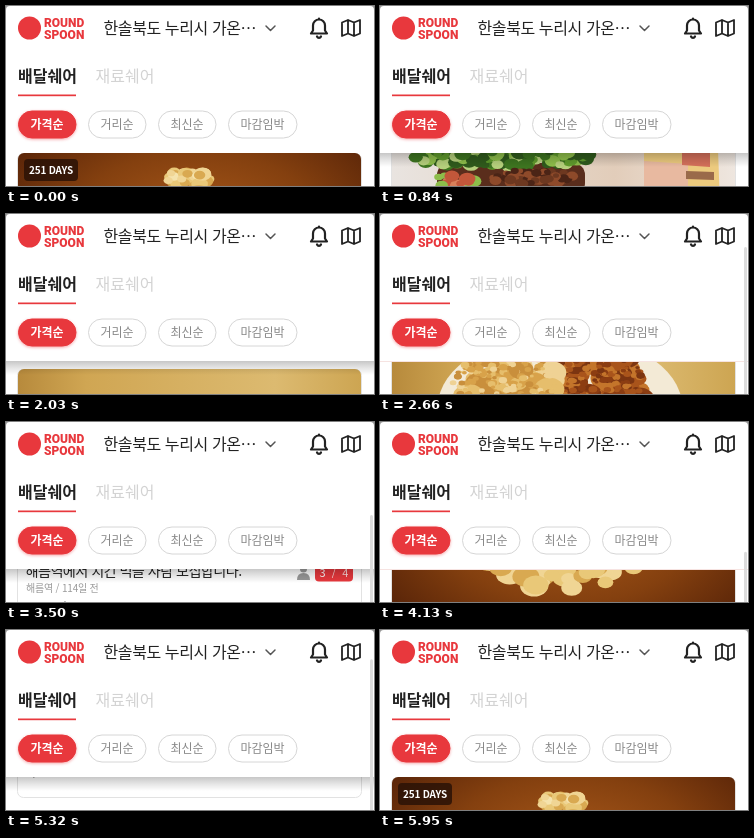
Recreate the animation shown at these times as an HTML page. Size 368 by 180 pixels, loop 6.16 s.

```html
<!DOCTYPE html>
<html lang="ko">
<head>
<meta charset="utf-8">
<title>배달쉐어</title>
<style>
  html, body { margin: 0; width: 100%; height: 100%; overflow: hidden; background: #fff; }
  svg { display: block; width: 368px; height: 180px; font-family: "Noto Sans CJK KR", "Noto Sans KR", "Noto Sans", sans-serif; }
  .brand { font: 900 12px Roboto, sans-serif; fill: #e8383d; }
  .place { font-size: 16px; letter-spacing: -.4px; fill: #222; }
  .tab { font-size: 16px; fill: #d3d3d3; }
  .tab.on { font-weight: 700; fill: #222; }
  .pill rect { fill: #fff; stroke: #d6d6d6; }
  .pill text { font-size: 12px; text-anchor: middle; fill: #888; }
  .pill.on rect { fill: #e8383d; stroke: #e8383d; filter: drop-shadow(0 1px 1.5px rgba(232, 56, 61, .45)); }
  .pill.on text { font-weight: 700; fill: #fff; }
  .icon { fill: none; stroke: #222; stroke-width: 2.2; stroke-linejoin: round; stroke-linecap: round; }
  .title { font-size: 14.2px; letter-spacing: -.6px; fill: #222; }
  .meta { font-size: 10px; letter-spacing: -.2px; fill: #999; }
  .price { font-size: 12px; fill: #222; }
  .count { font-size: 11px; text-anchor: middle; fill: #ffd9d9; }
  .count tspan { font-weight: 500; fill: #fff; }
  .days { font-size: 10px; font-weight: 700; letter-spacing: -.2px; text-anchor: middle; fill: #fff; }
</style>
</head>
<body>
<svg viewBox="0 0 368 180" xmlns="http://www.w3.org/2000/svg">
  <defs>
    <linearGradient id="shade" x2="0" y2="1">
      <stop stop-color="#000" stop-opacity=".22"/>
      <stop offset=".5" stop-color="#000" stop-opacity=".1"/>
      <stop offset="1" stop-color="#000" stop-opacity="0"/>
    </linearGradient>
    <radialGradient id="brown" cx=".52" cy=".35" r=".65">
      <stop stop-color="#a9591a"/>
      <stop offset=".55" stop-color="#84400f"/>
      <stop offset="1" stop-color="#572308"/>
    </radialGradient>
    <linearGradient id="cream">
      <stop stop-color="#e9e4e0"/>
      <stop offset=".65" stop-color="#e2cdba"/>
      <stop offset="1" stop-color="#eee6df"/>
    </linearGradient>
    <linearGradient id="wood">
      <stop stop-color="#b78a3c"/>
      <stop offset=".2" stop-color="#d0a653"/>
      <stop offset=".75" stop-color="#dcba70"/>
      <stop offset="1" stop-color="#cda552"/>
    </linearGradient>
    <clipPath id="frame"><path d="M0 200V6a6 6 0 0 1 6-6h331a6 6 0 0 1 6 6v194z"/></clipPath>
  </defs>

  <rect width="368" height="180" fill="#fff"/>
  <g id="list"></g>

  <rect id="shadow" y="147" width="368" height="14" fill="url(#shade)"/>
  <rect id="line" y="147" width="368" height="1" fill="#f6e3e1"/>
  <rect width="368" height="147" fill="#fff"/>

  <circle cx="23.5" cy="22" r="11.5" fill="#e8383d"/>
  <text class="brand" x="38" y="21">ROUND</text>
  <text class="brand" x="38" y="33">SPOON</text>
  <text class="place" x="97.5" y="27.5">한솔북도 누리시 가온⋯</text>
  <path class="icon" d="M260 20l4.500 4.500 4.500-4.500" style="stroke:#555;stroke-width:1.500"/>
  <path class="icon" d="M305 27.500h16l-2-3v-5a6 6 0 0 0-12 0v5zM313 13.500v-1M311 30.500a2.200 2.200 0 0 0 4 0"/>
  <path class="icon" d="M336 16.500l6-2.500 6 2.500 6-2.500v13.500l-6 2.500-6-2.500-6 2.500zM342 14v13.500M348 16.500v13.500" style="stroke-width:1.800"/>

  <text class="tab on" x="12" y="76">배달쉐어</text>
  <text class="tab" x="89.500" y="76">재료쉐어</text>
  <rect x="12" y="88.500" width="58" height="1.700" fill="#e8383d"/>
  <g id="pills"></g>

  <rect id="bar" x="364" width="3" height="230" rx="1.500" fill="#dcdcdc"/>
  <path d="M0 0h4a4 4 0 0 0-4 4zM368 0h-4a4 4 0 0 1 4 4z" fill="#999"/>
</svg>
<script>
const LOOP = 6160, STEP = 70, PITCH = 300, TOP = 147;
const $ = id => document.getElementById(id);

let seed = 7;
const rand = () => (seed = seed * 16807 % 2147483647) / 2147483647;

// Heap of rounded lumps inside an ellipse
function lumps(cx, cy, rx, ry, count, size, colors) {
  let out = '';
  for (let i = 0; i < count; i++) {
    const a = rand() * 2 * Math.PI, d = Math.sqrt(rand());
    const x = cx + Math.cos(a) * d * rx, y = cy + Math.sin(a) * d * ry;
    const r = size * (.5 + rand() * .6);
    const fill = colors[Math.floor(rand() * colors.length)];
    out += `<ellipse cx="${x.toFixed(1)}" cy="${y.toFixed(1)}" rx="${r.toFixed(1)}" ry="${(r * .75).toFixed(1)}" fill="${fill}"/>`;
  }
  return out;
}

// Large pieces with a fine crumb on top
const fried = (cx, cy, rx, ry, colors) =>
  lumps(cx, cy, rx, ry, 60, 16, colors) + lumps(cx, cy, rx, ry, 260, 4, colors);

const backdrop = id => `<rect width="343" height="200" fill="url(#${id})"/>`;
const gold = ['#e9c878', '#f5e3ad', '#d9a951', '#f0d594'];
const pale = ['#e6be6c', '#d8a24a', '#efd294', '#c98f3c'];
const dark = ['#a9541b', '#8c3d12', '#c4752b', '#7c3511'];

const crispy = () => backdrop('brown') +
  lumps(168, 26, 24, 8, 40, 8, gold) + lumps(170, 85, 85, 45, 130, 13, gold);

const burger = () => backdrop('cream') +
  '<path d="M30 108Q35 35 115 33T200 108z" fill="#c47a31"/>' +
  '<rect x="45" y="120" width="148" height="32" rx="12" fill="#5a2d1c"/>' +
  '<path d="M45 152h148q-2 36-74 36t-74-36z" fill="#c98742"/>' +
  '<path d="M252 45l72 5 4 112-76-4z" fill="#ecca7e"/>' +
  '<path d="M252 118l44 3v38l-44-2z" fill="#e8b9a0"/>' +
  '<path d="M290 106l28 2v16l-28-2z" fill="#d4705a"/>' +
  '<path d="M294 128l28 1v8l-28-1z" fill="#9a6a4a"/>' +
  lumps(112, 114, 92, 10, 150, 8, ['#5f9a2c', '#8dbd4a', '#2f5a1c', '#b5cf7c', '#3d7420']) +
  lumps(60, 138, 22, 6, 16, 8, ['#c2573a', '#d9805a', '#8dbd4a']) +
  lumps(138, 134, 46, 7, 60, 6, ['#4b2416', '#6d3820', '#8e4a2a']);

const chicken = () => backdrop('wood') +
  '<ellipse cx="168" cy="105" rx="122" ry="72" fill="#f3ead6"/>' +
  fried(205, 92, 48, 48, dark) + fried(112, 90, 52, 48, pale);

function person(y) {
  return `<g fill="#999"><circle cx="285.500" cy="${y - 3.5}" r="3.500"/>
    <path d="M279 ${y + 7.5}q0-7 6.500-7t6.500 7z"/></g>`;
}

function card({ photo, title, meta, price, joined, seats, days }, i) {
  return `<g transform="translate(12 ${TOP + i * PITCH})">
    <rect x="-.5" y=".5" width="344" height="283" rx="6" fill="#fff" stroke="#e2e2e2"/>
    <g clip-path="url(#frame)">${photo()}</g>
    ${days ? `<rect x="6" y="6" width="54" height="22" rx="4" fill="#2b1206" fill-opacity=".85"/>
      <text class="days" x="33" y="20.500">${days} DAYS</text>` : ''}
    <text class="title" x="7.500" y="225.500">${title}</text>
    <text class="meta" x="8" y="242">${meta}</text>
    <text class="price" x="8" y="262">${price}</text>
    ${person(222.5)}
    <rect x="297" y="213.500" width="38" height="18" rx="4" fill="#e8383d"/>
    <text class="count" x="316" y="226.500" xml:space="preserve"><tspan>${joined}</tspan>  /  ${seats}</text>
  </g>`;
}

const cards = [
  { photo: crispy, title: '해름역에서 치킨 먹을 사람 모집합니다.', meta: '해름역 / 114일 전', price: '6,000원', joined: 1, seats: 4, days: 251 },
  { photo: burger, title: '다솜역에서 햄버거 먹을 사람 모집합니다.', meta: '다솜역 / 114일 전', price: '7,000원', joined: 1, seats: 3 },
  { photo: chicken, title: '해름역에서 치킨 먹을 사람 모집합니다.', meta: '해름역 / 114일 전', price: '8,000원', joined: 3, seats: 4 },
  { photo: crispy, title: '다솜역에서 치킨 먹을 사람 모집합니다.', meta: '다솜역 / 114일 전', price: '9,000원', joined: 2, seats: 4 }
];
$('list').innerHTML = cards.map(card).join('');

const pills = [['가격순', 12, 58], ['거리순', 82, 58], ['최신순', 152, 58], ['마감임박', 222, 69]];
$('pills').innerHTML = pills.map(([label, x, w], i) => `<g class="pill${i ? '' : ' on'}">
  <rect x="${x + .5}" y="105" width="${w - .5}" height="27" rx="13.500"/>
  <text x="${x + w / 2}" y="123.200">${label}</text></g>`).join('');

// Pairs of time and value, eased in between
const scrollKeys = [[560, 0], [840, 410], [1190, 450], [1540, 504], [2380, 645], [2520, 645],
  [2660, 660], [3500, 819], [4165, 1010], [4830, 819], [5600, 24], [5950, 0]];
const barKeys = [[1890, 16], [2660, 33], [3500, 93], [4165, 130], [4830, 93], [5600, 2]];

function at(keys, t) {
  const i = keys.findIndex(k => k[0] > t);
  if (i === 0) return keys[0][1];
  if (i < 0) return keys[keys.length - 1][1];
  const [t0, a] = keys[i - 1], [t1, b] = keys[i];
  const p = (t - t0) / (t1 - t0);
  return a + (b - a) * p * p * (3 - 2 * p);
}

const within = (t, from, to) => t >= from && t < to;
const show = (id, on) => $(id).setAttribute('visibility', on ? 'visible' : 'hidden');

function draw(now) {
  const t = Math.floor(now % LOOP / STEP) * STEP;
  $('list').setAttribute('transform', `translate(0 ${-Math.round(at(scrollKeys, t))})`);
  $('bar').setAttribute('y', at(barKeys, t).toFixed(1));
  const shaded = within(t, 630, 2310) || within(t, 2730, 4130) || within(t, 4480, 5600);
  show('shadow', shaded);
  show('line', !shaded && within(t, 2310, 4480));
  show('bar', within(t, 2240, 5670));
}

const start = performance.now();
function tick() {
  draw(performance.now() - start);
  requestAnimationFrame(tick);
}
tick();
</script>
</body>
</html>
```
